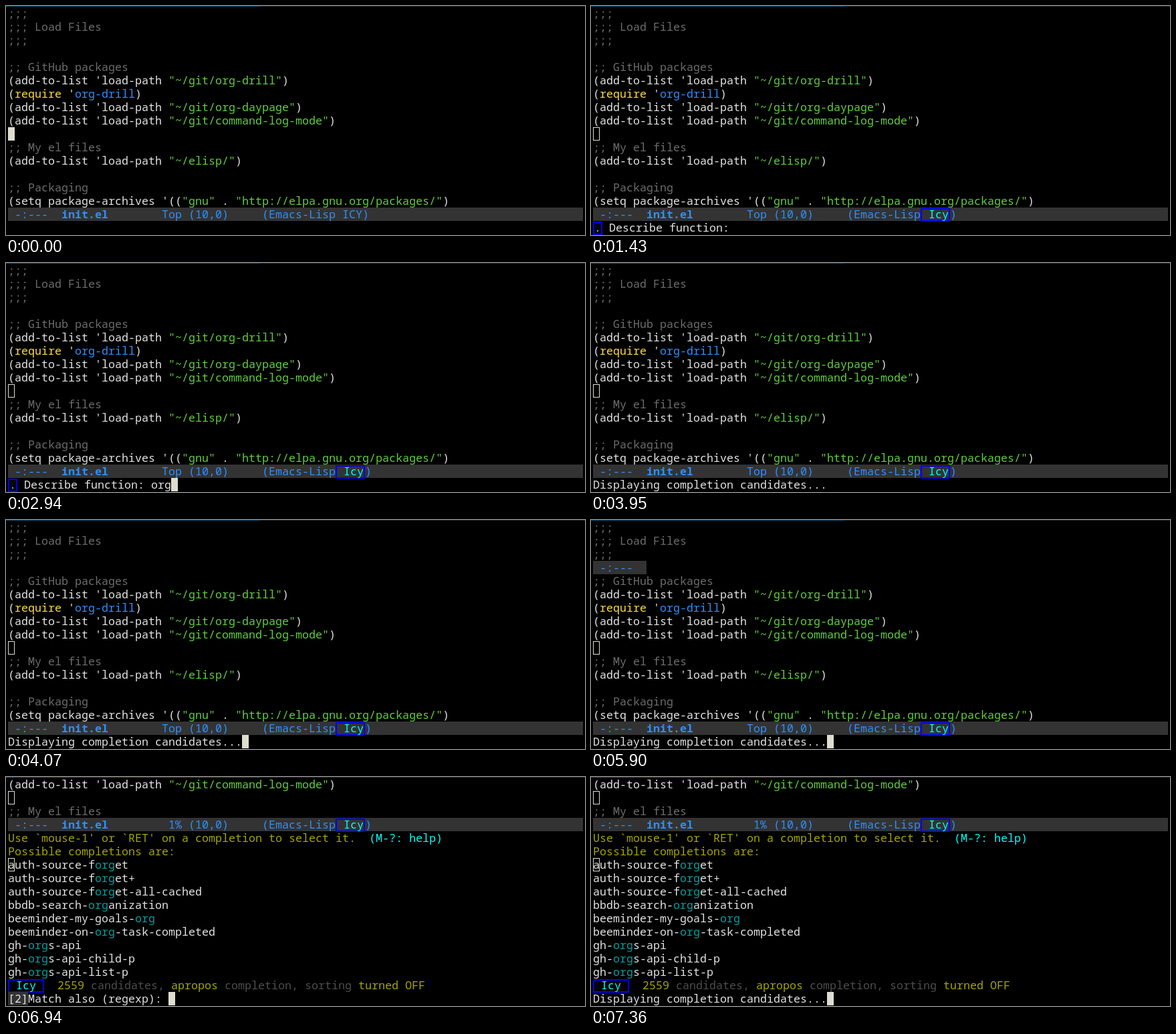
An HTML page with a canvas that plays this animation: 866 by 342 pixels, repeating every 8000 ms.

```html
<!DOCTYPE html>
<html lang="en">
<head>
<meta charset="utf-8">
<title>Editor completion</title>
<style>
  html, body { margin: 0; width: 100%; height: 100%; overflow: hidden; background: #000; }
  canvas { display: block; }
</style>
</head>
<body>
<canvas id="screen" width="866" height="342"></canvas>
<script>
const ctx = document.getElementById('screen').getContext('2d');
const LOOP = 8000, LEFT = 3, TOP = 1, CELL = 10, ROW = 20, RIGHT = 863;
const FONT = '16.667px "Noto Sans Mono", "DejaVu Sans Mono", monospace';
const C = {
  text: '#e2e2e2', comment: '#6c6c6c', string: '#5fcf3c', keyword: '#ffdc3c',
  blue: '#2e90ff', bar: '#333333', box: '#0000ff', cyan: '#00ffff',
  cursor: '#deded0', olive: '#a5a500', match: '#00a0a0', dim: '#4d4d4d'
};
const ECHO = 16;
const MESSAGE = 'Displaying completion candidates...';

const code = [
  ';;;', ';;; Load Files', ';;;', '',
  ';; GitHub packages',
  '(add-to-list \'load-path "~/git/org-drill")',
  "(require 'org-drill)",
  '(add-to-list \'load-path "~/git/org-daypage")',
  '(add-to-list \'load-path "~/git/command-log-mode")',
  '',
  ';; My el files',
  '(add-to-list \'load-path "~/elisp/")',
  '',
  ';; Packaging',
  '(setq package-archives \'(("gnu" . "http://elpa.gnu.org/packages/")'
];

const candidates = [
  'auth-source-forget', 'auth-source-forget+', 'auth-source-forget-all-cached',
  'bbdb-search-organization', 'beeminder-my-goals-org',
  'beeminder-on-org-task-completed', 'gh-orgs-api', 'gh-orgs-api-child-p',
  'gh-orgs-api-list-p'
];

const rowTop = row => TOP + row * ROW;
const colX = col => LEFT + col * CELL;

function fill(color, x, y, w, h) {
  ctx.fillStyle = color;
  ctx.fillRect(x, y, w, h);
}

// Draws text on the character grid and returns the x where it ends.
function write(row, x, text, color = C.text, weight = 300) {
  ctx.font = `${weight} ${FONT}`;
  ctx.fillStyle = color;
  for (const ch of text) {
    ctx.fillText(ch, x, rowTop(row) + 16);
    x += CELL;
  }
  return x;
}

function boxed(row, x, text) {
  const w = text.length * CELL + 4;
  ctx.strokeStyle = C.box;
  ctx.lineWidth = 2;
  ctx.strokeRect(x + 1, rowTop(row) + 2, w - 2, ROW - 2);
  write(row, x + 2, text, C.cyan);
  return x + w;
}

function solidCursor(row, x) {
  fill(C.cursor, x, rowTop(row), CELL, ROW);
}

function hollowCursor(row) {
  ctx.strokeStyle = C.cursor;
  ctx.lineWidth = 1;
  ctx.strokeRect(LEFT + 0.5, rowTop(row) + 0.5, CELL - 1, ROW - 1);
}

function codeLine(row, line) {
  if (line.startsWith(';')) return write(row, LEFT, line, C.comment);
  let x = LEFT;
  for (const part of line.split(/("[^"]*"|require|(?<= ')org-drill)/)) {
    const color = part[0] === '"' ? C.string
      : part === 'require' ? C.keyword
      : part === 'org-drill' ? C.blue : C.text;
    x = write(row, x, part, color);
  }
}

function modeLine(row, position, active) {
  fill(C.bar, LEFT, rowTop(row), RIGHT - LEFT, ROW);
  write(row, LEFT, ' -:---', C.blue);
  write(row, colX(8), 'init.el', C.blue, 700);
  write(row, colX(26 - position.length), position, C.blue);
  write(row, colX(27), '(10,0)', C.blue);
  let x = write(row, colX(38), '(Emacs-Lisp', C.blue);
  x = active ? boxed(row, x, ' Icy') : write(row, x, ' ICY', C.blue);
  write(row, x, ')', C.blue);
}

function echo(text, cursor, x = LEFT) {
  const end = write(ECHO, x, text);
  if (cursor) solidCursor(ECHO, end);
}

function editor(t) {
  const active = t >= 1430;
  code.forEach((line, row) => codeLine(row, line));
  if (active) hollowCursor(9);
  else solidCursor(9, LEFT);
  modeLine(15, 'Top', active);

  if (t >= 5900) {
    fill(C.bar, LEFT, rowTop(3), 8 * CELL, ROW);
    write(3, LEFT, ' -:---', C.blue);
  }
  if (t >= 3950) echo(MESSAGE, t >= 4070);
  else if (active) {
    const typed = 'org'.slice(0, [2760, 2820, 2900].filter(at => t >= at).length);
    const cursor = (t >= 1470 && t < 1940) || (t >= 2440 && t < 2900) || t >= 2940;
    echo(' Describe function: ' + typed, cursor, boxed(ECHO, LEFT, '.'));
  }
}

function completions(t) {
  codeLine(0, code[8]);
  hollowCursor(1);
  codeLine(2, code[10]);
  modeLine(3, '1%', true);
  const x = write(4, LEFT, "Use `mouse-1' or `RET' on a completion to select it.  ", C.olive);
  write(4, x, '(M-?: help)', C.cyan);
  write(5, LEFT, 'Possible completions are:', C.olive);
  candidates.forEach((name, i) => {
    let x = LEFT;
    for (const part of name.split(/(org)/))
      x = write(6 + i, x, part, part === 'org' ? C.match : C.text);
  });
  hollowCursor(6);

  let end = boxed(15, LEFT, ' Icy ');
  ['  2559', ' candidates, ', 'apropos', ' completion, sorting ', 'turned OFF']
    .forEach((part, i) => end = write(15, end, part, i % 2 ? C.dim : C.olive));

  if (t >= 7320) echo(MESSAGE, t >= 7360);
  else if (t < 7230) {
    fill(C.bar, LEFT, rowTop(ECHO), 3 * CELL, ROW);
    echo('[2]Match also (regexp): ', (t >= 5980 && t < 6440) || t >= 6940);
  }
}

function draw(now) {
  const t = now % LOOP;
  fill('#000', 0, 0, 866, 342);
  fill('#262626', 0, 0, 866, 1);
  fill('#0a4a70', 0, 0, 379, 1);
  (t < 5940 ? editor : completions)(t);
  requestAnimationFrame(draw);
}
requestAnimationFrame(draw);
</script>
</body>
</html>
```
